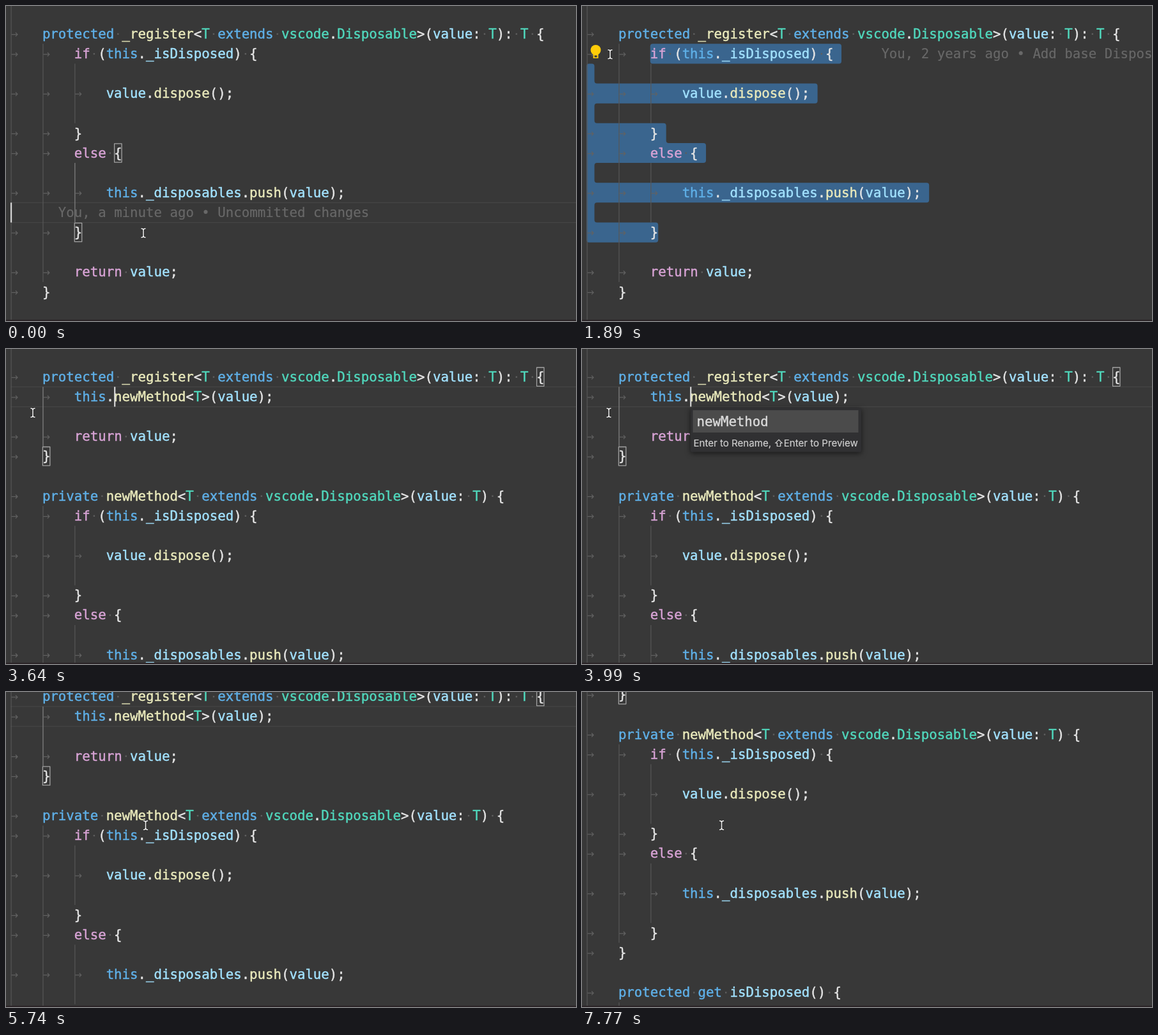
Animation, 892 px wide and 494 px high, one loop 7840 ms. Source, as an HTML page with a canvas:

```html
<!DOCTYPE html>
<html lang="en">
<head>
<meta charset="utf-8">
<title>Extract to method</title>
<style>
html, body { margin: 0; width: 100%; height: 100%; overflow: hidden; background: #383838; }
canvas { display: block; }
</style>
</head>
<body>
<canvas id="stage" width="892" height="494"></canvas>
<script>
const ctx = document.getElementById('stage').getContext('2d');
const LOOP = 7840, STEP = 70;
const LEFT = 7, TOP = 28.2, CW = 12.47, LH = 31.13;
const MONO = '20.72px "DejaVu Sans Mono", monospace';
const UI = 'Inter, "DejaVu Sans", sans-serif';

// Moments of the story, in ms
const PRESS = 455, RELEASE = 1400, SETTLED = 1540, MENU = 2240, APPLY = 3500,
      RENAME = 3700, RENAMED = 4760, SCROLL = 5555, SCROLL_END = 6160;

const body = [
  '\t\tif (this._isDisposed) {', '', '\t\t\tvalue.dispose();', '', '\t\t}',
  '\t\telse {', '', '\t\t\tthis._disposables.push(value);', '', '\t\t}'
];
const signature = '\tprotected _register<T extends vscode.Disposable>(value: T): T {';
const ending = ['', '\t\treturn value;', '\t}'];
const before = [signature, ...body, ...ending];
const after = [
  signature, '\t\tthis.newMethod<T>(value);', ...ending, '',
  '\tprivate newMethod<T extends vscode.Disposable>(value: T) {', ...body, '\t}', '',
  '\tprotected get isDisposed() {', '\t\treturn this._isDisposed;'
];

// Indent guides: [tab level, first row, last row, active]
const guidesBefore = [[1, 1, 12], [2, 2, 4], [2, 7, 9]];
const guidesAfter = [[1, 1, 3, true], [1, 7, 16], [2, 8, 10], [2, 13, 15], [1, 20, 20]];

const colors = [
  [/^(protected|private|extends|this|get)$/, '#5fb0e8'],
  [/^(if|else|return)$/, '#d8a3d5'],
  [/^(T|vscode|Disposable)$/, '#50d8bd'],
  [/^(_register|newMethod|dispose|push)$/, '#eaeabc'],
  [/^\w/, '#a2e2ff'],
  [/./, '#e6e6e6']
];

// Pointer path: [time, x, y]
const path = [
  [0, 215, 356], [140, 215, 356], [420, 128, 356], [490, 128, 356], [980, 137, 139],
  [1330, 104, 75], [1560, 104, 75], [2050, 24, 76], [2900, 24, 76], [3200, 42, 100],
  [4800, 42, 100], [5320, 218.5, 209], [LOOP, 218.5, 209]
];

const tabs = line => line.match(/^\t*/)[0].length;
const columns = line => line.length + 3 * tabs(line);
const colX = col => LEFT + col * CW;
const rowY = row => TOP + row * LH;
const between = (t, a, b) => t >= a && t < b;

function ease(u) {
  u = Math.min(1, Math.max(0, u));
  return u * u * (3 - 2 * u);
}

function pointerAt(t) {
  const i = path.findIndex(p => p[0] > t);
  const [t0, x0, y0] = path[i - 1], [t1, x1, y1] = path[i];
  const u = ease((t - t0) / (t1 - t0));
  return { x: x0 + (x1 - x0) * u, y: y0 + (y1 - y0) * u };
}

function rect(x, y, w, h, color) {
  ctx.fillStyle = color;
  ctx.fillRect(x, y, w, h);
}

function box(x, y, w, h, r, fill, stroke) {
  ctx.beginPath();
  ctx.roundRect(x, y, w, h, r);
  ctx.fillStyle = fill;
  ctx.fill();
  if (stroke) {
    ctx.lineWidth = 1;
    ctx.strokeStyle = stroke;
    ctx.stroke();
  }
}

// A thin outline gives the text its slightly heavier weight
function text(str, x, y, color, font = MONO, weight = .45) {
  ctx.font = font;
  ctx.fillStyle = ctx.strokeStyle = color;
  ctx.lineWidth = weight;
  ctx.lineJoin = 'round';
  ctx.fillText(str, x, y);
  ctx.strokeText(str, x, y);
}

function polyline(points, width, color) {
  ctx.beginPath();
  points.forEach(([x, y]) => ctx.lineTo(x, y));
  ctx.lineWidth = width;
  ctx.strokeStyle = color;
  ctx.stroke();
}

function drawLine(line, row) {
  const indent = tabs(line), y = rowY(row), mid = y + 16.5;
  for (let i = 0; i < indent; i++) {
    const x = colX(4 * i);
    polyline([[x + 1.5, mid], [x + 11, mid]], 1.2, '#626262');
    polyline([[x + 8, mid - 3], [x + 11, mid], [x + 8, mid + 3]], 1.2, '#626262');
  }
  let col = 4 * indent;
  for (const token of line.trim().match(/\w+|./g) || []) {
    const x = colX(col);
    if (token === ' ') rect(x + 5, y + 14.5, 2.4, 2.4, '#5e5e5e');
    else text(token, x, y + 22.7, colors.find(c => c[0].test(token))[1]);
    col += token.length;
  }
}

function drawGuides(list, activeRow) {
  for (const [level, from, to, active] of list) {
    const bright = active || from === activeRow;
    rect(colX(4 * level) + .5, rowY(from), 1.2, (to - from + 1) * LH, bright ? '#858585' : '#575757');
  }
}

function drawCurrentRow(row) {
  for (const y of [rowY(row), rowY(row + 1)]) rect(LEFT, y - .5, 892, 1.2, '#454545');
}

function drawBracket(row, col) {
  ctx.lineWidth = 1.3;
  ctx.strokeStyle = '#a2a2a2';
  ctx.strokeRect(colX(col) + .5, rowY(row) + .8, CW - 1, LH - 1.8);
}

function drawBlame(str, row, col) {
  text(str, colX(col), rowY(row) + 22.7, '#686868', MONO, .2);
}

function drawCaret(row, col) {
  rect(colX(col), rowY(row), 2.2, LH, '#d6d6d6');
}

// Nearest caret position to the pointer; tabs snap as a whole
function caretFor({ x, y }) {
  const row = Math.floor((y - TOP) / LH), line = before[row];
  const col = (x - LEFT) / CW, indent = 4 * tabs(line);
  return {
    row,
    col: col < indent ? 4 * Math.round(col / 4) : Math.min(columns(line), Math.round(col))
  };
}

function drawSelection({ row, col }) {
  const last = 10, color = '#3a658e';
  const right = r => colX(columns(before[r]) + (r < last ? 1 : 0));
  const width = right(row) - colX(col);
  if (width > 0) box(colX(col), rowY(row), width, LH, 4, color);
  if (row >= last) return;
  const points = [];
  for (let r = row + 1; r <= last; r++) {
    points.push([right(r), rowY(r)], [right(r), rowY(r + 1)]);
  }
  points.push([LEFT, rowY(last + 1)], [LEFT, rowY(row + 1)]);
  ctx.beginPath();
  ctx.moveTo(LEFT + 5, rowY(row + 1));
  points.forEach((p, i) => ctx.arcTo(...p, ...points[(i + 1) % points.length], 4));
  ctx.fillStyle = color;
  ctx.fill();
}

function drawBulb() {
  ctx.beginPath();
  ctx.arc(21.5, 69, 8, 0, 7);
  ctx.fillStyle = '#ffcc08';
  ctx.fill();
  rect(17.5, 74, 8, 8, '#ffcc08');
  rect(19.5, 77.5, 4, 3, '#383838');
}

function drawMenu() {
  ctx.save();
  ctx.shadowColor = 'rgba(0,0,0,.45)';
  ctx.shadowBlur = 8;
  ctx.shadowOffsetY = 2;
  box(25.5, 94.5, 289, 57, 4, '#424c55');
  ctx.restore();
  box(25.5, 94.5, 289, 57, 4, '#424c55', '#74797e');
  rect(26, 96.5, 288, 19.5, '#4183d9');
  rect(26, 121, 288, 1, '#59616a');
  const font = '13.7px ' + UI;
  text("Extract to method in class 'Disposable'", 46, 111, '#fff', font, .2);
  text('Learn more about JS/TS refactorings', 46, 142, '#f2f2f2', font, .2);
}

function drawRename() {
  ctx.save();
  ctx.shadowColor = 'rgba(0,0,0,.6)';
  ctx.shadowBlur = 9;
  ctx.shadowOffsetY = 2;
  box(170, 92.5, 267, 69, 2, '#303032');
  ctx.restore();
  rect(173.5, 96, 259, 35, '#4b4b4b');
  text('newMethod', 179.5, 121, '#dadada');
  text('Enter to Rename, ⇧Enter to Preview', 174.5, 152.5, '#cecece', '15.08px ' + UI, .2);
}

function drawIBeam(x, y) {
  const stem = [[x, y - 6], [x, y + 6]];
  const cap = s => [[x - 3.5, y + 7 * s], [x - 1, y + 6.5 * s], [x, y + 5 * s],
                    [x + 1, y + 6.5 * s], [x + 3.5, y + 7 * s]];
  for (const [width, color] of [[3.4, '#2a2a2a'], [1.5, '#f2f2f2']]) {
    [stem, cap(-1), cap(1)].forEach(p => polyline(p, width, color));
  }
}

function drawArrow(x, y) {
  const shape = [[0, 0], [0, 14], [3.2, 11], [5.7, 16.5], [8.2, 15.4], [5.8, 10.2], [10, 10]];
  ctx.beginPath();
  shape.forEach(([dx, dy]) => ctx.lineTo(x + dx, y + dy));
  ctx.closePath();
  ctx.lineWidth = 2.4;
  ctx.strokeStyle = '#fff';
  ctx.stroke();
  ctx.fillStyle = '#111';
  ctx.fill();
}

function drawPointer(t, { x, y }) {
  const pressed = between(t, PRESS, RELEASE) || between(t, 2130, MENU) || between(t, 3290, 3400);
  if (pressed) {
    ctx.beginPath();
    ctx.arc(x, y, 15, 0, 7);
    ctx.fillStyle = 'rgba(45,45,45,.75)';
    ctx.fill();
    ctx.lineWidth = 1.3;
    ctx.strokeStyle = '#d8d8d8';
    ctx.stroke();
  }
  if (between(t, 1960, APPLY)) drawArrow(x, y);
  else drawIBeam(x, y);
}

function drawBefore(t, pointer, blink) {
  const idle = t < PRESS;
  const caret = t < RELEASE ? caretFor(pointer) : { row: 1, col: 8 };
  if (idle) drawCurrentRow(9);
  else drawSelection(caret);
  drawGuides(guidesBefore, idle ? 7 : -1);
  before.forEach(drawLine);
  if (idle) {
    drawBracket(6, 13);
    drawBracket(10, 8);
    drawBlame('You, a minute ago • Uncommitted changes', 9, 6);
    return;
  }
  if (t < RELEASE || (t < MENU && blink)) drawCaret(caret.row, caret.col);
  if (t >= SETTLED) {
    drawBlame('You, 2 years ago • Add base Disposable', 1, 37);
    drawBulb();
  }
  if (t >= MENU) drawMenu();
}

function drawAfter(t, blink) {
  ctx.save();
  ctx.translate(0, -164 * ease((t - SCROLL) / (SCROLL_END - SCROLL)));
  drawCurrentRow(1);
  drawGuides(guidesAfter, -1);
  after.forEach(drawLine);
  drawBracket(0, 66);
  drawBracket(4, 4);
  if (blink || t < RENAMED) drawCaret(1, 13);
  if (between(t, RENAME, RENAMED)) drawRename();
  ctx.restore();
}

function draw(now) {
  const t = Math.floor((now % LOOP) / STEP) * STEP;
  const pointer = pointerAt(t), blink = t % 1060 < 400;
  rect(0, 0, 892, 494, '#383838');
  if (t < APPLY) drawBefore(t, pointer, blink);
  else drawAfter(t, blink);
  rect(LEFT + .5, 0, 1.2, 494, '#575757');
  if (t < PRESS && blink) drawCaret(9, 0);
  rect(0, 492, 892, 2, '#2b2427');
  drawPointer(t, pointer);
}

const start = performance.now();
function tick() {
  draw(performance.now() - start);
  requestAnimationFrame(tick);
}
tick();
</script>
</body>
</html>
```
